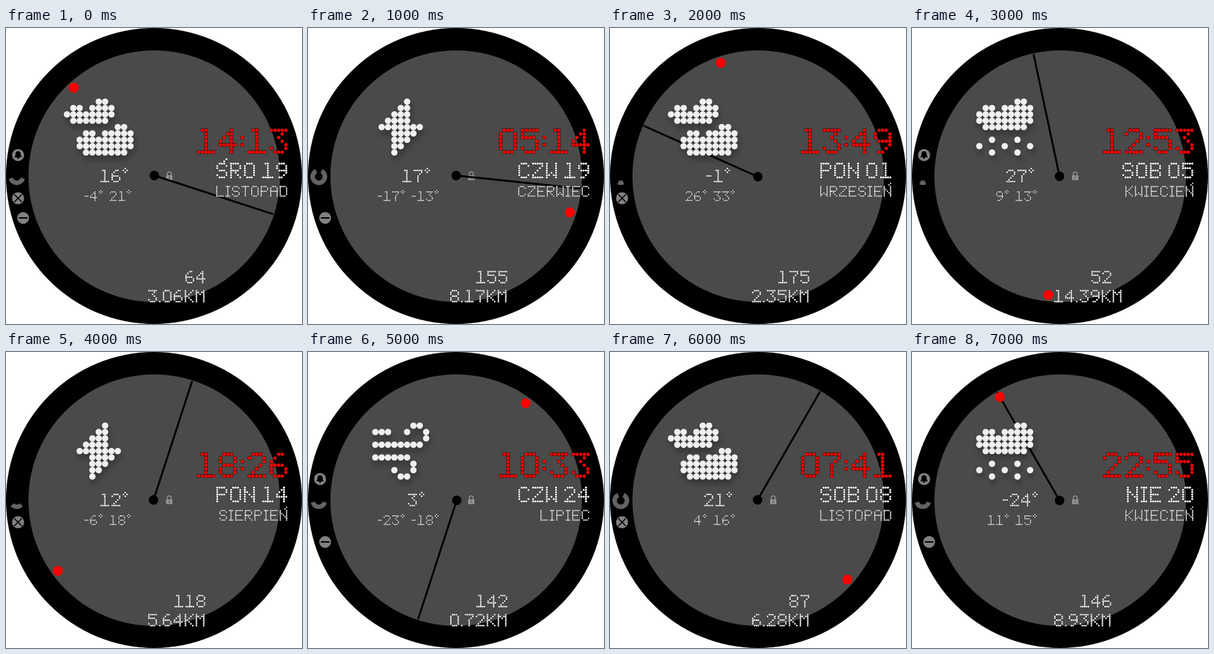
An HTML page with a canvas that plays this animation: 466x466 px, repeating every 8000 ms.

```html
<!DOCTYPE html>
<html lang="pl">
<head>
<meta charset="utf-8">
<title>Watch face</title>
<style>
html, body { margin: 0; height: 100%; overflow: hidden; background: #fff; }
canvas { display: block; }
</style>
</head>
<body>
<canvas id="face" width="466" height="466"></canvas>
<script>
const ctx = document.getElementById('face').getContext('2d');
const TAU = Math.PI * 2, C = 233.2, GREY = '#7f8281';

// Strokes on a dot grid: points are "xy" in base 36, commas lift the pen.
const GLYPHS = {
  0: '10 30 41 45 36 16 05 01 10', 1: '10 20 26,06 46',
  2: '01 10 30 41 42 06 46', 3: '00 40 22 44 45 36 16 05',
  4: '36 30 03 04 44', 5: '40 00 02 32 43 45 36 16 05',
  6: '30 20 02 05 16 36 45 44 33 03', 7: '00 40 41 23 26',
  8: '10 30 41 42 33 13 02 01 10,04 05 16 36 45 44', 9: '43 13 02 01 10 30 41 44 26 16',
  A: '06 01 10 30 41 46,03 43', B: '06 00 30 41 42 33 03,44 45 36 06',
  C: '41 30 10 01 05 16 36 45', D: '00 30 41 45 36 06 00',
  E: '40 00 06 46,03 33', I: '00 20,10 16,06 26', K: '00 06,40 13 46',
  L: '00 06 46', M: '06 00 22 40 46', N: '06 00,01 45,40 46', O: '10 30 41 45 36 16 05 01 10',
  P: '06 00 30 41 42 33 03', R: '06 00 30 41 42 33 03,13 46',
  S: '41 30 10 01 02 13 33 44 45 36 16 05', T: '00 40,20 26',
  W: '00 06 24 46 40', Z: '00 40 41 05 06 46',
  ':': '02,04', '.': '06', '-': '03 23', '°': '10 01 12 21', '\u0301': '40 31', ' ': ''
};
const WIDTHS = { I: 3, '-': 3, '°': 3, ':': 1, '.': 1, ' ': 1 };
const RISE = { '°': 1, '\u0301': 2 };

const ICONS = {
  clouds: '50 60,11 21,41 71,02 72,13 63,84 94,35 45,65 a5,26 a6,27 a7,38 98',
  bolt: '60,51 61,42 62,33 63,24 84,45 75,46 66,47 57,48',
  rain: '70 80,21 31,51 91,12 92,13 93,24 84,36,76,17,57,97,38,78',
  wind: '70 80,11 31,61,91 92,13 83,15 65,76 77,47,58 68'
};

// Status letters: b bell, x crossed, m minus, l lock.
// Gauge: half of the arc in degrees, measured from the bottom.
const SCENES = [
  { icon: 'clouds', time: '14:13', date: 'ŚRO 19', month: 'LISTOPAD', temp: '16°', low: '-4°', high: '21°',
    steps: '64', km: '3.06', hand: 108, dot: 318, status: 'bxml', gauge: 75 },
  { icon: 'bolt', time: '05:14', date: 'CZW 19', month: 'CZERWIEC', temp: '17°', low: '-17°', high: '-13°',
    steps: '155', km: '8.17', hand: 96, dot: 108, status: 'ml', gauge: 155 },
  { icon: 'clouds', time: '13:49', date: 'PON 01', month: 'WRZESIEŃ', temp: '-1°', low: '26°', high: '33°',
    steps: '175', km: '2.35', hand: 294, dot: 342, status: 'x', gauge: 24 },
  { icon: 'rain', time: '12:53', date: 'SOB 05', month: 'KWIECIEŃ', temp: '27°', low: '9°', high: '13°',
    steps: '52', km: '14.39', hand: 348, dot: 186, status: 'bl', gauge: 24 },
  { icon: 'bolt', time: '18:26', date: 'PON 14', month: 'SIERPIEŃ', temp: '12°', low: '-6°', high: '18°',
    steps: '118', km: '5.64', hand: 18, dot: 234, status: 'xl', gauge: 48 },
  { icon: 'wind', time: '10:33', date: 'CZW 24', month: 'LIPIEC', temp: '3°', low: '-23°', high: '-18°',
    steps: '142', km: '0.72', hand: 198, dot: 36, status: 'bml', gauge: 75 },
  { icon: 'clouds', time: '07:41', date: 'SOB 08', month: 'LISTOPAD', temp: '21°', low: '4°', high: '16°',
    steps: '87', km: '6.28', hand: 30, dot: 132, status: 'xl', gauge: 155 },
  { icon: 'rain', time: '22:55', date: 'NIE 20', month: 'KWIECIEŃ', temp: '-24°', low: '11°', high: '15°',
    steps: '146', km: '8.93', hand: 330, dot: 330, status: 'bml', gauge: 75 }
];

function disc(x, y, r, color) {
  ctx.fillStyle = color;
  ctx.beginPath();
  ctx.arc(x, y, r, 0, TAU);
  ctx.fill();
}

function line(x1, y1, x2, y2, width, color = '#000') {
  ctx.strokeStyle = color;
  ctx.lineWidth = width;
  ctx.beginPath();
  ctx.moveTo(x1, y1);
  ctx.lineTo(x2, y2);
  ctx.stroke();
}

function dots(strokes, x, y, pitch, r, color) {
  for (const stroke of strokes.split(',').filter(Boolean)) {
    const points = stroke.split(' ').map(p => [...p].map(c => parseInt(c, 36)));
    points.forEach(([x2, y2], i) => {
      const [x1, y1] = points[i - 1] || [x2, y2];
      const n = Math.max(Math.abs(x2 - x1), Math.abs(y2 - y1));
      for (let k = i ? 1 : 0; k <= n; k++) {
        const f = n ? k / n : 0;
        disc(x + (x1 + (x2 - x1) * f) * pitch, y + (y1 + (y2 - y1) * f) * pitch, r, color);
      }
    });
  }
}

// align: 0 left, 0.5 centre, 1 right; y is the centre of the top row.
function text(string, x, y, pitch, align, color = '#fff') {
  const chars = [...string.normalize('NFD')];
  const advance = c => c === '\u0301' ? 0 : (WIDTHS[c] ?? 5) + 1;
  const columns = chars.reduce((sum, c) => sum + advance(c), -1);
  let left = x - columns * pitch * align + pitch / 2, last = left;
  for (const c of chars) {
    const at = c === '\u0301' ? last : left;
    const top = y - (RISE[c] || 0) * pitch;
    dots(GLYPHS[c], at, top, pitch, pitch * 0.53, '#000');
    dots(GLYPHS[c], at, top, pitch, pitch * 0.45, color);
    last = left;
    left += advance(c) * pitch;
  }
}

// Runs draw with the centre as origin, turned clockwise from twelve.
function turned(degrees, draw) {
  ctx.save();
  ctx.translate(C, C);
  ctx.rotate(degrees * TAU / 360);
  draw();
  ctx.restore();
}

function bell() {
  disc(19, 200, 9.5, GREY);
  ctx.fillStyle = '#000';
  ctx.beginPath();
  ctx.moveTo(13, 203.5);
  ctx.quadraticCurveTo(15, 202, 15, 198);
  ctx.arc(19, 198, 4, Math.PI, 0);
  ctx.quadraticCurveTo(23, 202, 25, 203.5);
  ctx.fill();
  disc(19, 204.5, 1.6, '#000');
}

function lock() {
  ctx.fillStyle = '#929292';
  ctx.fillRect(252, 232, 10, 7.5);
  ctx.strokeStyle = '#929292';
  ctx.lineWidth = 1.6;
  ctx.beginPath();
  ctx.moveTo(254, 233);
  ctx.arc(257, 229.5, 3, Math.PI, 0);
  ctx.lineTo(260, 233);
  ctx.stroke();
  ctx.fillStyle = '#4a4a4a';
  ctx.fillRect(256.4, 234, 1.3, 3);
}

const STATUS = {
  b: bell,
  l: lock,
  x() {
    disc(19, 268, 9.5, GREY);
    line(13, 262, 25, 274, 1.7);
    line(25, 262, 13, 274, 1.7);
  },
  m() { disc(27, 299, 9.3, GREY); line(20, 299, 34, 299, 2.2); }
};

function gauge(half) {
  const span = half * TAU / 360;
  ctx.strokeStyle = '#636363';
  ctx.lineWidth = 7;
  ctx.beginPath();
  ctx.arc(17, 234, 9.7, TAU / 4 - span, TAU / 4 + span);
  ctx.stroke();
}

function draw(s) {
  ctx.fillStyle = '#fff';
  ctx.fillRect(0, 0, 466, 466);
  disc(233, 233, 233, '#000');
  disc(233.3, 233.3, 198, '#4a4a4a');

  for (const key of s.status) STATUS[key]();
  gauge(s.gauge);

  turned(s.hand, () => {
    line(-1, 0, -1, -197, 3);
    disc(-1, 0, 7.5, '#000');
  });
  turned(s.dot, () => disc(-1, -188, 7.8, '#f00'));

  ctx.save();
  ctx.shadowColor = 'rgba(0,0,0,.3)';
  ctx.shadowBlur = 9;
  ctx.shadowOffsetX = 2;
  ctx.shadowOffsetY = 7;
  dots(ICONS[s.icon], 96, 116, 10, 4.8, '#f0f0f0');
  ctx.restore();
  dots(ICONS[s.icon], 96, 116, 10, 4.8, '#f0f0f0');

  text(s.time, 443.5, 161, 5.72, 1, '#f00');
  text(s.date, 443, 213.5, 3.62, 1);
  text(s.month, 443, 249.5, 2.5, 1);
  text(s.temp, 170.2, 224.2, 2.93, 0.5);
  text(s.low, 152.5, 258, 2.25, 1);
  text(s.high, 163, 258, 2.25, 0);
  text(s.steps, 314, 383.5, 2.9, 1);
  text(s.km + 'KM', 223.5, 413.5, 2.88, 0);
}

const start = performance.now();
function tick() {
  const t = performance.now() - start;
  draw(SCENES[Math.floor(t / 1000) % SCENES.length]);
  requestAnimationFrame(tick);
}
tick();
</script>
</body>
</html>
```
